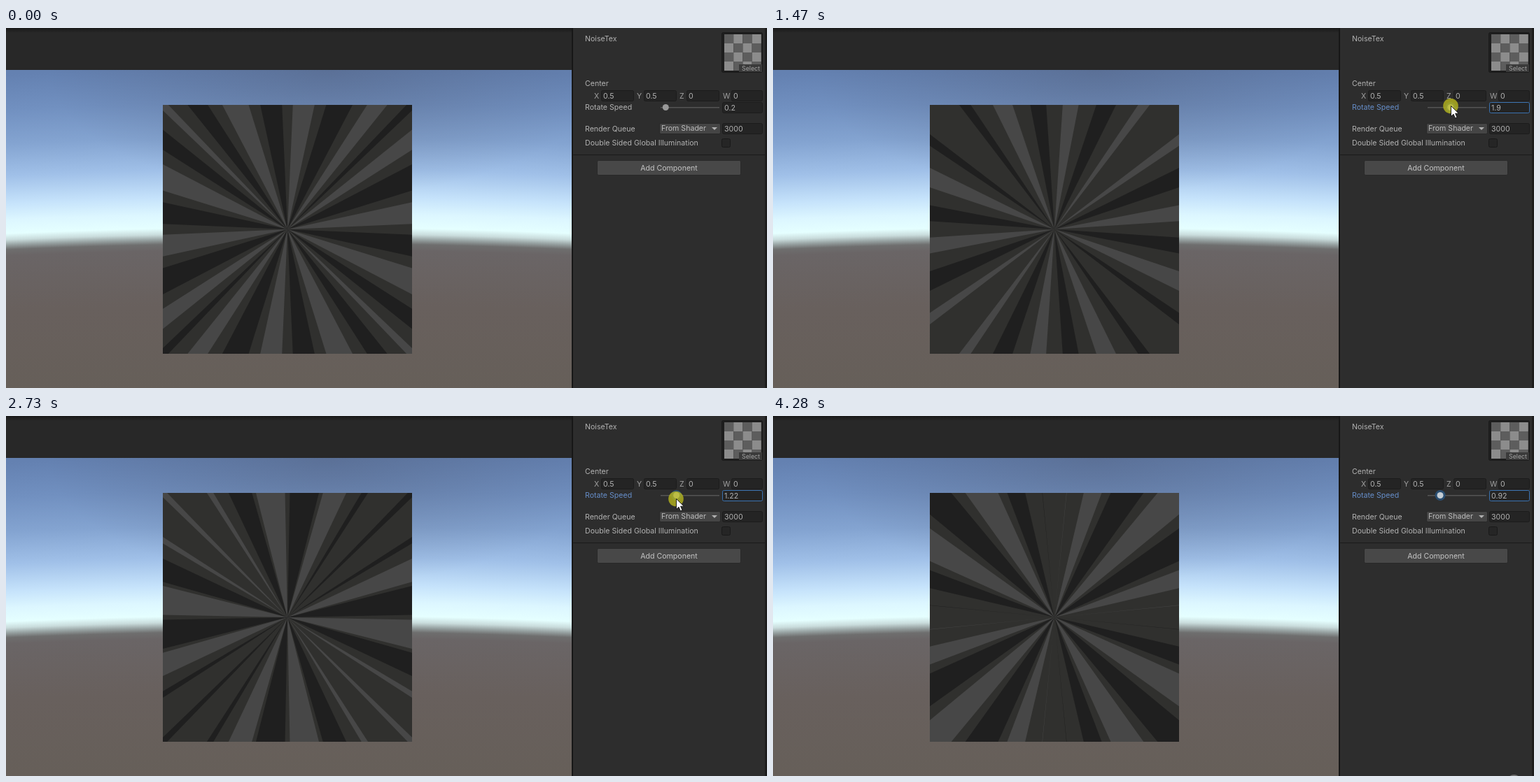
Recreate the animation shown at these times as an HTML page with a canvas. Size 1087 px wide and 515 px high, loop 4350 ms.

```html
<!DOCTYPE html>
<html lang="en">
<head>
<meta charset="utf-8">
<style>
  html, body { margin: 0; width: 100%; height: 100%; overflow: hidden; background: #2d2d2d; }
  canvas { display: block; }
</style>
</head>
<body>
<canvas id="stage" width="1087" height="515"></canvas>
<script>
const LOOP = 4350, STEP = 70;
const ctx = document.getElementById('stage').getContext('2d');
const backdrop = document.createElement('canvas');
backdrop.width = 1087;
backdrop.height = 515;

// Key values are [step, value, ...]; speed also drives the ray angle.
const CLOCK_START = 157.298;
const SPEED = [[0, .2], [14, .2], [16, .32328], [19, 1.1], [23, 2.7], [26, 3.39347],
  [30, 3.12], [35, 2.13204], [39, 1.21889], [42, .91773], [62, .91773]];
const CURSOR = [[1, 1054, 478], [4, 1026, 380], [7, 968, 190], [9, 948, 122], [11, 943, 111],
  [14, 944, 111], [16, 946, 111], [19, 956, 111], [23, 980, 111], [26, 990, 111], [32, 978, 112],
  [35, 971, 118], [39, 957, 118], [42, 953, 118], [44, 955, 130], [48, 1002, 350],
  [51, 1027, 457], [54, 1050, 490], [56, 1052, 506], [60, 1050, 516]];
const PRESS = 13, RELEASE = 43;

// Ray edges within a quarter turn, in degrees clockwise from the top.
const EDGES = [0, 14.8, 30.1, 41.2, 48.8, 59.9, 75.2];

const mod = (a, n) => ((a % n) + n) % n;

function at(keys, k) {
  const i = Math.max(1, keys.findIndex(key => key[0] >= k));
  const a = keys[i - 1], b = keys[i], u = (k - a[0]) / (b[0] - a[0]);
  return a.slice(1).map((v, j) => v + (b[j + 1] - v) * u);
}

function rect(c, x, y, w, h, fill) {
  c.fillStyle = fill;
  c.fillRect(x, y, w, h);
}

function box(c, x, y, w, h, fill, stroke) {
  c.beginPath();
  c.roundRect(x + .5, y + .5, w - 1, h - 1, 2);
  c.fillStyle = fill;
  c.fill();
  c.strokeStyle = stroke;
  c.lineWidth = 1;
  c.stroke();
}

function disc(c, x, y, r, fill) {
  c.beginPath();
  c.arc(x, y, r, 0, 7);
  c.fillStyle = fill;
  c.fill();
}

function label(c, text, x, y, color = '#b2b2b2', size = 10.6) {
  c.font = `${size}px Inter, sans-serif`;
  c.fillStyle = color;
  c.fillText(text, x, y);
}

const field = (c, x, y, w, text, stroke = '#1c1c1c') => {
  box(c, x, y, w, 16, '#242424', stroke);
  label(c, text, x + 3, y + 12);
};

function drawScene(c) {
  const stops = [[60, '#6481b1'], [110, '#7190c0'], [160, '#84a4d1'], [205, '#a0c0e8'],
    [245, '#c6e3fb'], [268, '#dcf6ff'], [288, '#e5ffff'], [297, '#c9dcdc'], [304, '#98a3a3'],
    [311, '#6e6e6e'], [320, '#6a6566'], [400, '#68605d'], [515, '#665f59']];
  for (let x = 0; x < 808; x += 4) {
    const bend = 9 * ((x - 404) / 404) ** 2 - 3;
    const sky = c.createLinearGradient(0, 60 + bend, 0, 515 + bend);
    stops.forEach(([y, color]) => sky.addColorStop((y - 60) / 455, color));
    rect(c, x, 60, 4, 455, sky);
  }
  const shade = c.createRadialGradient(460, 60, 0, 460, 60, 400);
  shade.addColorStop(0, 'rgba(75,85,110,.4)');
  shade.addColorStop(1, 'rgba(75,85,110,0)');
  c.save();
  c.beginPath();
  c.rect(0, 60, 808, 200);
  c.clip();
  c.translate(0, 60);
  c.scale(1, .45);
  c.translate(0, -60);
  rect(c, 0, 60, 808, 445, shade);
  c.restore();

  rect(c, 0, 0, 808, 60, '#282828');
  const edge = c.createLinearGradient(0, 0, 0, 7);
  edge.addColorStop(0, '#191919');
  edge.addColorStop(1, '#282828');
  rect(c, 0, 0, 808, 7, edge);
}

function drawPanel(c) {
  rect(c, 808, 0, 279, 515, '#2d2d2d');
  rect(c, 808, 0, 2, 515, '#171717');
  rect(c, 1084, 0, 3, 515, '#1c1c1c');
  rect(c, 810, 181, 274, 1, '#1a1a1a');

  label(c, 'NoiseTex', 827, 19);
  box(c, 1022, 6, 59, 58, '#1e1e1e', '#1a1a1a');
  for (let i = 0; i < 16; i++) {
    const col = i % 4, row = i >> 2;
    rect(c, 1026 + col * 13.2, 9 + row * 13, 13.2, 13, (col + row) % 2 ? '#8c8c8c' : '#5d5d5d');
  }
  rect(c, 1047, 52, 33, 11, '#3a3a3a');
  label(c, 'Select', 1051, 61, '#a4a4a4', 8.8);

  label(c, 'Center', 827, 83);
  [['X', 840, 850, '0.5'], ['Y', 901, 911, '0.5'], ['Z', 962, 972, '0'], ['W', 1024, 1036, '0']]
    .forEach(([name, x, fx, value]) => {
      label(c, name, x, 101, '#a0a0a0');
      field(c, fx, 89, fx === 1036 ? 45 : 47, value);
    });

  label(c, 'Render Queue', 827, 148);
  box(c, 933, 136, 88, 16, '#454545', '#272727');
  label(c, 'From Shader', 936, 147, '#bcbcbc');
  c.fillStyle = '#b0b0b0';
  c.fill(new Path2D('M1008 142h8l-4 4z'));
  field(c, 1023, 136, 58, '3000');
  label(c, 'Double Sided Global Illumination', 827, 168);
  box(c, 1022, 158, 13, 13, '#252525', '#191919');
  box(c, 844, 189, 206, 22, '#484848', '#292929');
  c.textAlign = 'center';
  label(c, 'Add Component', 947, 204, '#c4c4c4');
  c.textAlign = 'left';
}

// +1 on a light ray, -1 on a dark one; flips every quarter turn.
function ray(deg) {
  const d = mod(deg, 180), quarter = mod(d, 90);
  const count = EDGES.filter(e => e <= quarter).length + (d >= 90 ? 1 : 0);
  return count % 2 ? 1 : -1;
}

function drawRays(angle) {
  const cuts = [];
  for (let turn = 0; turn < 360; turn += 90)
    for (const e of EDGES) cuts.push(mod(turn + e + angle, 360), mod(turn + e - angle, 360));
  cuts.sort((a, b) => a - b);

  ctx.save();
  ctx.beginPath();
  ctx.rect(224, 110, 356, 356);
  ctx.clip();
  rect(ctx, 224, 110, 356, 356, '#30302e');
  ctx.translate(402, 288);
  cuts.forEach((from, i) => {
    const to = cuts[i + 1] ?? cuts[0] + 360, mid = (from + to) / 2;
    const sum = ray(mid - angle) + ray(mid + angle);
    if (!sum) return;
    ctx.beginPath();
    ctx.moveTo(0, 0);
    ctx.arc(0, 0, 270, (from - 90) * Math.PI / 180, (to - 90) * Math.PI / 180);
    ctx.fillStyle = sum > 0 ? '#474747' : '#1f1f1f';
    ctx.fill();
  });
  ctx.restore();
}

function drawSlider(k, speed) {
  const focused = k >= PRESS, x = 939.3 + 15 * speed;
  label(ctx, 'Rotate Speed', 827, 117, focused ? '#668ec9' : '#b2b2b2');
  rect(ctx, 935, 113, 84, 1.5, '#555');
  if (focused) disc(ctx, x, 113.5, 7.5, '#294d70');
  disc(ctx, x, 113.5, 4.5, focused ? '#c3ccd4' : '#999');
  field(ctx, 1023, 106, 58, String(+speed.toFixed(2)), focused ? '#3a72b0' : '#1c1c1c');
}

function drawCursor(k) {
  if (k < 1) return;
  if (k >= 60) return disc(ctx, 1058.5, 523.5, 10.5, '#6e6e6e');
  const [x, y] = at(CURSOR, k);
  if (k >= PRESS && k < RELEASE) disc(ctx, x, y + .5, 10.8, 'rgba(186,184,28,.78)');
  ctx.save();
  ctx.translate(x, y);
  const arrow = new Path2D('M.5 .5V15.5L4 12.2L6.4 17.8L9 16.7L6.6 11.2H11.3Z');
  ctx.fillStyle = '#fff';
  ctx.fill(arrow);
  ctx.strokeStyle = '#111';
  ctx.lineWidth = .9;
  ctx.stroke(arrow);
  ctx.restore();
}

function draw(now) {
  const k = Math.floor((now % LOOP) / STEP + .15);
  const [speed] = at(SPEED, k);
  const angle = speed * (CLOCK_START + k * STEP / 1000) * 180 / Math.PI;
  ctx.drawImage(backdrop, 0, 0);
  drawRays(mod(angle, 180));
  drawSlider(k, speed);
  drawCursor(k);
  requestAnimationFrame(() => draw(performance.now() - start));
}

drawScene(backdrop.getContext('2d'));
drawPanel(backdrop.getContext('2d'));
const start = performance.now();
draw(0);
</script>
</body>
</html>
```
